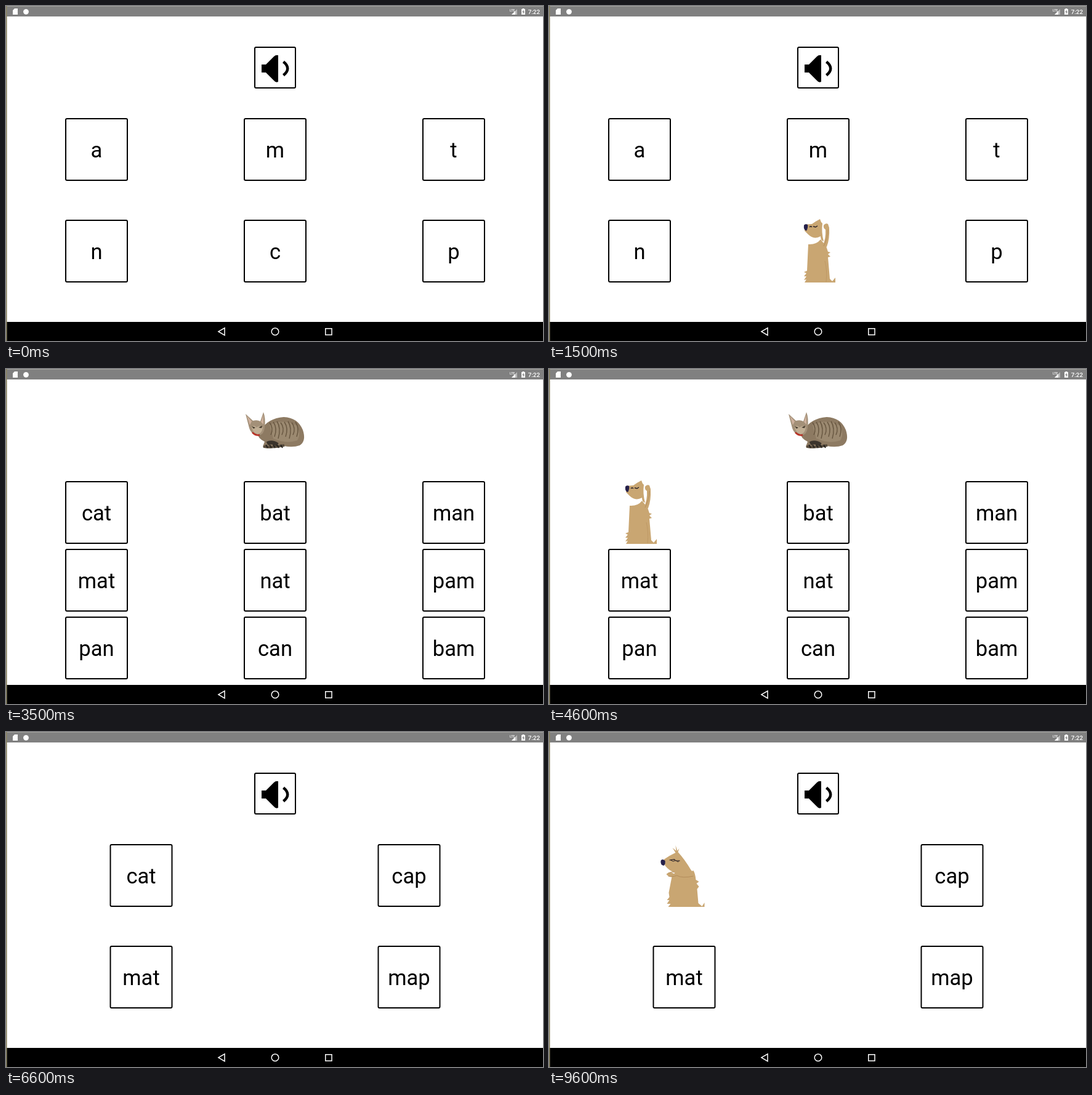
Write an HTML page with a canvas that moves like this. It is 872 px wide and 544 px high and loops after 10 s.

```html
<!DOCTYPE html>
<html lang="en">
<head>
<meta charset="utf-8">
<title>Letter and word game</title>
<style>
  html, body { margin: 0; width: 100%; height: 100%; overflow: hidden; background: #fff; }
  canvas { display: block; width: 872px; height: 544px; }
</style>
</head>
<body>
<canvas id="stage" width="872" height="544"></canvas>
<script>
const ctx = document.getElementById('stage').getContext('2d');
const LOOP = 10000;
const TILE = 102;
const FUR = '#c9a672', SHADE = '#b08a58', NAVY = '#25204a';

const screens = {
  letters: { words: ['a', 'm', 't', 'n', 'c', 'p'], xs: [96, 386, 676], top: 182, step: 165 },
  picture: { words: ['cat', 'bat', 'man', 'mat', 'nat', 'pam', 'pan', 'can', 'bam'],
             xs: [96, 386, 676], top: 182, step: 110.2, cat: true },
  pairs: { words: ['cat', 'cap', 'mat', 'map'], xs: [168.5, 603.5], top: 182, step: 165 }
};

// start time, screen, chosen word, state of its tile
const timeline = [
  [0, 'letters'],
  [900, 'letters', 'c', 'pressed'],
  [1000, 'letters', 'c', 'happy'],
  [3500, 'picture'],
  [4000, 'picture', 'cat', 'pressed'],
  [4100, 'picture', 'cat', 'happy'],
  [6600, 'pairs'],
  [8500, 'pairs', 'cat', 'pressed'],
  [8600, 'pairs', 'cat', 'grumpy']
];

function rect(x, y, w, h, color) {
  ctx.fillStyle = color;
  ctx.fillRect(x, y, w, h);
}

function shape(path, color) {
  ctx.fillStyle = color;
  ctx.fill(new Path2D(path));
}

function line(path, color, width) {
  ctx.strokeStyle = color;
  ctx.lineWidth = width;
  ctx.stroke(new Path2D(path));
}

function at(x, y, draw) {
  ctx.save();
  ctx.translate(x, y);
  draw();
  ctx.restore();
}

function frame(size, filled) {
  ctx.beginPath();
  ctx.roundRect(1, 1, size - 2, size - 2, 2);
  ctx.strokeStyle = ctx.fillStyle = '#000';
  ctx.lineWidth = 2;
  if (filled) ctx.fill();
  ctx.stroke();
}

function label(text, x, y, font, color) {
  ctx.font = font + ' Roboto, sans-serif';
  ctx.textAlign = 'center';
  ctx.fillStyle = color;
  ctx.fillText(text, x, y);
}

function speaker() {
  frame(68);
  shape('M12 29H19L32 16Q35 13 39 14V57Q35 59 32 55L19 42H12Z', '#000');
  line('M47.5 24.5Q61 35.5 47.5 46.5', '#000', 4.5);
}

function cat() {
  shape('M28 29Q39 10 65 8Q88 9 96 29Q102 47 91 54Q80 58 65 55L48 58Q34 60 31 56L34 48Q23 43 21 32Z', '#8d7a62');
  shape('M42 21Q64 10 86 22Q94 35 87 46Q69 52 48 43Z', '#9b8970');
  for (let i = 0; i < 8; i++) {
    const x = 42 + i * 6;
    line(`M${x} ${17 - i % 3}Q${x + 7} 26 ${x + 2} ${37 + i % 3 * 3}`, '#66553f', 1.4);
  }
  shape('M3 3L15 14Q22 12 27 15L32 0Q36 10 34 25Q33 36 25 38Q13 38 9 26Z', '#a39078');
  shape('M5 6L13 15L10 21ZM32 4L28 16L32 20Z', '#ceb19d');
  shape('M13 24Q17 20 21 25Q26 20 31 25Q29 36 22 36Q14 33 13 24Z', '#c0ae94');
  shape('M13 23L19 25L16 27ZM24 25L30 22L29 26Z', '#42382a');
  line('M14 33Q20 39 26 37', '#b83327', 2.5);
  line('M32 56Q48 58 66 54', '#584c3d', 4);
  line('M38 51Q46 47 55 53', '#3b342c', 6);
  for (let x = 36; x < 65; x += 6) line(`M${x} 53l3 5`, '#25221e', 2);
}

function happyDog() {
  shape('M35 40Q48 41 55 32L64 43L67 52L71 53L67 56L71 60L67 61L70 96L74 100L79 94V102H29L32 97L28 98L32 92L28 92L32 87L28 85L33 83Z', FUR);
  shape('M58 43Q64 31 63 16Q59 14 60 9Q63 5 67 7L69 13Q70 31 65 44Z', FUR);
  line('M60 43Q66 32 67 16', SHADE, 0.8);
  shape('M29 8L41 7Q48 2 54 -1L56 4L58 6Q56 20 60 35Q55 34 55 27Q44 33 35 24L29 18Z', FUR);
  shape('M28 9Q30 6 34 8Q35 13 32 18Q27 17 28 9Z', NAVY);
  line('M37 12Q39 10 41 12M43 11l4 1l3-2', '#282026', 1.5);
  line('M62 67Q66 82 64 101', '#b9935f', 0.7);
}

function grumpyDog() {
  shape('M31 53Q51 49 66 43Q69 48 70 58L75 61L71 64L75 69L72 73L74 96L80 101L84 95V102H25L29 97L23 97L27 91L23 91L27 86L26 79Z', FUR);
  shape('M18 25Q28 18 37 14L32 6L38 11L37 2L40 11L43 7L41 13Q52 25 62 42Q69 49 66 56Q47 61 34 51L36 46Q27 44 20 35Z', FUR);
  shape('M22 49Q27 43 34 48Q47 45 64 44Q69 49 66 55Q48 59 39 52Q28 56 22 49Z', FUR);
  line('M25 52Q30 54 39 51Q48 56 66 52M36 46Q30 44 26 47', SHADE, 0.9);
  shape('M13 27Q15 23 20 27Q21 32 18 35Q12 34 13 27Z', NAVY);
  line('M27 26L35 25L37 27L44 27', '#282026', 1.2);
  line('M29 26l4 2l3-1M38 27l3 2l2-2', '#282026', 1);
}

function tile(word, state) {
  if (state === 'happy') return happyDog();
  if (state === 'grumpy') return grumpyDog();
  frame(TILE, state === 'pressed');
  if (!state) label(word, TILE / 2, 64.3, '34.6px', '#000');
}

function statusBar() {
  rect(0, 0, 872, 17, '#808080');
  rect(0, 0, 872, 1, '#a3a39d');
  shape('M14 4H19V14H11V7Z', '#fff');
  ctx.beginPath();
  ctx.arc(32.5, 9.3, 4.4, 0, Math.PI * 2);
  ctx.fill();
  label('LTE', 822, 9, '500 5px', '#fff');
  shape('M821 14L830 5V14Z', '#b8b8b8');
  shape('M821 14L827 8V14Z', '#fff');
  shape('M838.5 4H841.5V5H843V14H837V5H838.5Z', '#fff');
  shape('M840.7 6L838.3 10H840V13L842 9H840.5Z', '#808080');
  label('7:22', 857.3, 13, '500 9.8px', '#fff');
}

function navBar() {
  rect(0, 513, 872, 31, '#000');
  line('M345 528.7L355 522.8V534.6Z', '#fff', 1.5);
  ctx.beginPath();
  ctx.arc(437, 528.7, 5.8, 0, Math.PI * 2);
  ctx.stroke();
  ctx.strokeRect(518.8, 523.8, 10.2, 10.2);
}

function render(time) {
  const [, name, chosen, state] = timeline.findLast(step => step[0] <= time);
  const screen = screens[name];
  rect(0, 0, 872, 544, '#fff');
  statusBar();
  navBar();
  rect(0, 0, 1.6, 544, '#8b8565');
  if (screen.cat) at(386, 70, cat);
  else at(403, 66, speaker);
  screen.words.forEach((word, i) => {
    const cols = screen.xs.length;
    const y = Math.round(screen.top + Math.floor(i / cols) * screen.step);
    at(screen.xs[i % cols], y, () => tile(word, word === chosen && state));
  });
}

const start = performance.now();
function tick() {
  render((performance.now() - start) % LOOP);
  requestAnimationFrame(tick);
}
tick();
</script>
</body>
</html>
```
